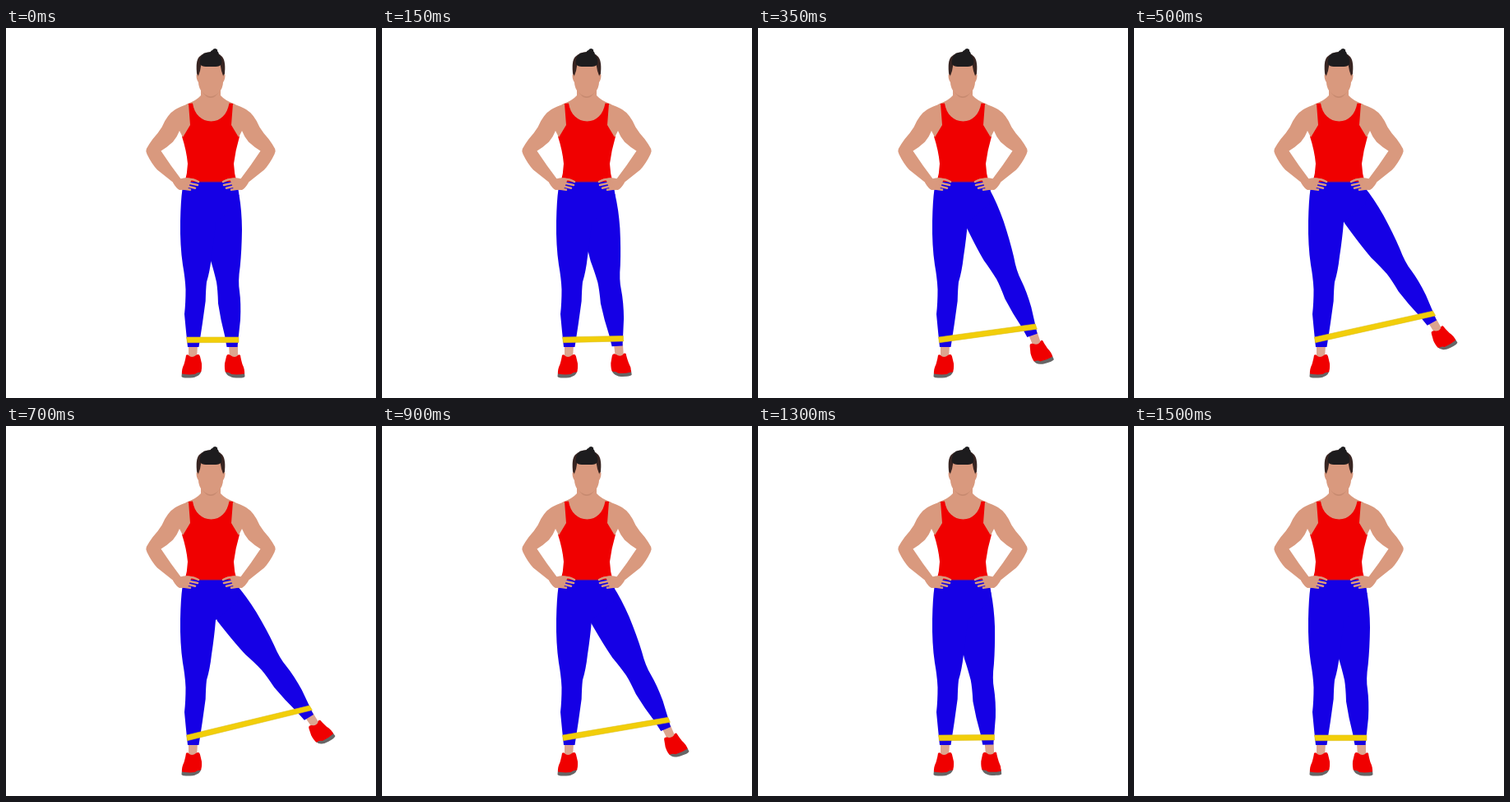
An HTML page that plays this animation: 450x450 px, repeating every 1550 ms.

```html
<!DOCTYPE html>
<html lang="en">
<head>
<meta charset="utf-8">
<title>Banded side leg raise</title>
<style>
  html, body { margin: 0; width: 100%; height: 100%; overflow: hidden; background: #fff; }
  svg { display: block; width: 100vw; height: 100vh; }
  .skin { fill: #d9997e; }
  .top { fill: #f00000; }
  .pants { fill: #1500e5; }
  .fingers { fill: none; stroke: #d9997e; stroke-width: 2.5; stroke-linecap: round; }
</style>
</head>
<body>
<svg viewBox="0 0 450 450">
  <defs>
    <g id="shoe">
      <path fill="#dca58f" d="M222 386H233L232 402H222Z"/>
      <path fill="#666" d="M214 418L213.500 424Q215 425.500 220 425.500Q229 425.500 231 424Q236 422.500 237.500 417Z"/>
      <path class="top" d="M219 398Q221 396 223 399Q227 401.500 231 398Q235 395.500 236 399.500L238 408Q238.500 415 237 418.500Q232 418.500 230 421Q222 422 214 420.500Q213.500 415 216.500 409Q218.500 402 219 398Z"/>
    </g>
    <g id="arm">
      <path class="skin" d="M222 92Q211 96 206 99Q196 105 189.600 120.500Q185 128 178.500 135Q174 141 170.800 147Q169.500 150 171.500 153.500Q177 165 184 172.500Q196 182 206 190L213 184Q200 167 188.500 149.500Q196 145 203 138.500Q208 133 211 125L215 133L224 118Z"/>
      <path class="skin" d="M205 184.500Q211 184 216 182.500Q221 181.500 226 183.500L221 196.500L211 197Q207 195 203 188Z"/>
      <path class="fingers" d="M220 183.800Q228 183.500 234 187M218 187.800L233 191M217 191.500L230 194.800M214 195.200L224 196.800"/>
    </g>
  </defs>

  <use href="#shoe"/>
  <g id="leg">
    <use href="#shoe" transform="translate(504) scale(-1 1)"/>
    <path class="pants" d="M283.500 203Q286.800 222 287 245Q286.700 270 284.700 290Q282 308 284 320Q286 335 285 355L281.500 388H268.500L266 374Q261 355 258 335Q257.500 318 256 309Q252.500 294 249 283Q245 264 241 230L245 203Z"/>
  </g>
  <path class="pants" d="M217 186H281L283.500 203L281 215L255 236Q253.500 255 250 278Q248 296 244 309Q243 318 242.700 332Q239 360 234.500 388H221Q219 370 217 348Q218.500 335 218.500 318Q218 305 215 288Q211.500 265 212 235Q212.500 210 214.500 196Z"/>

  <path class="skin" d="M237 72V82Q232 88 219 93V120H279V93Q266 88 261 82V72Z"/>
  <path class="top" d="M221 92L227 91.500C229 105 238 113.500 249.500 113.500S269 105 271.500 91.500L277 92Q277 118 284 132Q279 149 277 165Q277.500 177 280.500 187H217.500Q220.500 177 221 165Q219.500 149 214 132Q220 118 221 92Z"/>
  <path d="M230 187H268" stroke="#b0103c" stroke-width="1"/>
  <use href="#arm"/>
  <use href="#arm" transform="translate(498) scale(-1 1)"/>

  <path fill="#382522" d="M232.500 59Q230 40 235 35Q241 29 249 29Q258 29 263 35Q268 41 265.500 59Z"/>
  <path class="skin" d="M231.500 57Q233 55 234 59V66Q231.500 63 231.500 57ZM266.500 57Q265 55 264 59V66Q266.500 63 266.500 57Z"/>
  <path fill="#c78a70" d="M237 75Q243 85 249 85Q255 85 261 75Z"/>
  <path class="skin" d="M234 58Q236.500 52 237.500 44H260.500Q261.500 52 264 58Q265 70 261 76Q255 83.300 249 83.300Q243 83.300 237 76Q233 70 234 58Z"/>
  <path fill="#1d1c1e" d="M249 32Q247.500 28 251 27Q253 24 256 25.500Q258 26.500 257 28Q260 31 258 34Z"/>
  <path fill="#1d1c1e" d="M236 44Q234.500 35 241 31Q249 28 257 31Q263.500 35 262 44Q260 47 255 47H243Q238 47 236 44Z"/>

  <path id="band" fill="#f2ce0a" stroke="#dcc01c" stroke-width=".6"/>
</svg>
<script>
  const LOOP = 1550, STEP = 50;
  const HIP = [262, 205];
  // time, leg angle, angular speed per ms
  const KEYS = [
    [0, 0, 0], [250, 10.1, .085], [500, 29.1, .04], [620, 32, 0], [700, 31.4, -.02],
    [900, 22.9, -.066], [1100, 9.6, -.055], [1300, 1.5, -.015], [1500, 0, 0]
  ];
  const leg = document.getElementById('leg');
  const band = document.getElementById('band');

  // cubic Hermite interpolation between keys
  function angleAt(t) {
    const i = KEYS.findIndex(k => k[0] > t);
    if (i < 0) return 0;
    const [t0, a, va] = KEYS[i - 1], [t1, b, vb] = KEYS[i];
    const d = t1 - t0, u = (t - t0) / d, w = 1 - u;
    return w * w * ((1 + 2 * u) * a + u * d * va) + u * u * ((3 - 2 * u) * b - w * d * vb);
  }

  function swing(x, y, deg) {
    const r = deg * Math.PI / 180, c = Math.cos(r), s = Math.sin(r);
    return [HIP[0] + x * c + y * s, HIP[1] - x * s + y * c].map(v => v.toFixed(2));
  }

  function draw(now) {
    const t = Math.floor(now % LOOP / STEP) * STEP;
    const a = angleAt(t);
    leg.setAttribute('transform', `rotate(${-a} ${HIP})`);
    band.setAttribute('d', `M219.500 376L${swing(21, 171, a)}L${swing(21, 177.5, a)}L220.500 382.700Z`);
  }

  const start = performance.now();
  function tick() {
    draw(performance.now() - start);
    requestAnimationFrame(tick);
  }
  tick();
</script>
</body>
</html>
```
